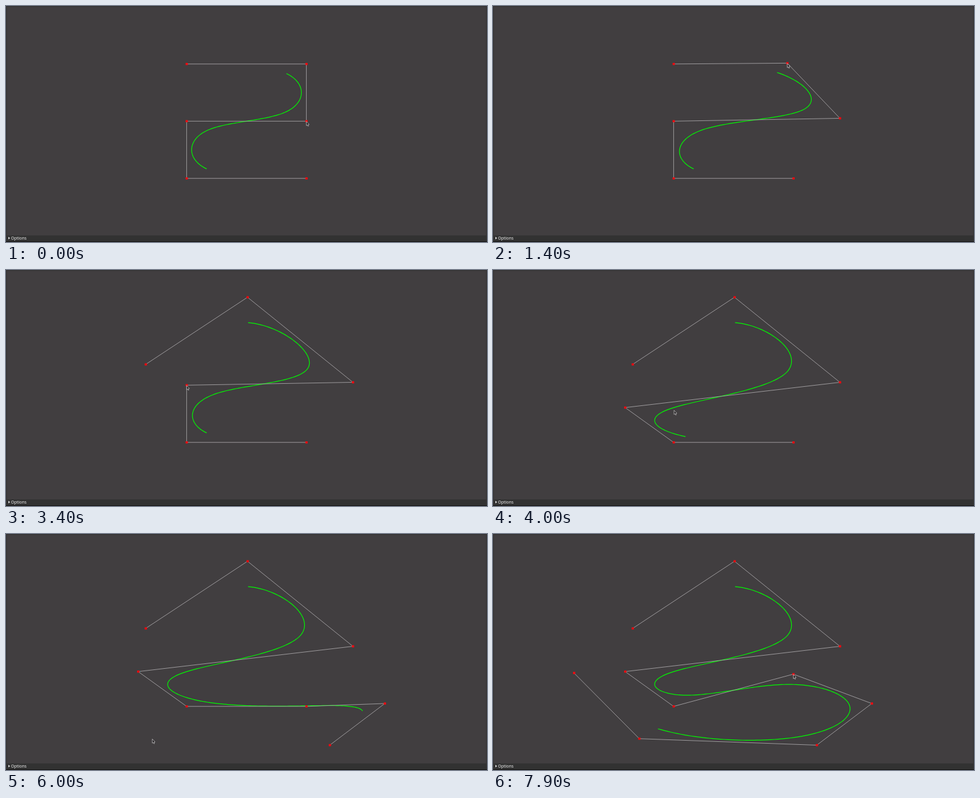
Recreate the animation shown at these times as an HTML page with a canvas. Size 800x394 px, loop 8000 ms.

```html
<!DOCTYPE html>
<html lang="en">
<head>
<meta charset="utf-8">
<title>B-spline editor</title>
<style>
  html, body { margin: 0; width: 100%; height: 100%; overflow: hidden; background: #413e40; }
  canvas { display: block; }
</style>
</head>
<body>
<canvas id="stage" width="800" height="394"></canvas>
<script>
const ctx = document.getElementById('stage').getContext('2d');
const STEP = 100, LOOP = 8000;

// Three rows, joined back and forth
const startPoints = Array.from({ length: 6 }, (_, i) => {
  const row = Math.floor(i / 2);
  const side = (i + row) % 2 ? 1 : -1;
  return [400 + side * 99.6, 192.3 + (row - 1) * 95.5];
});

// Each press moves an existing point or places a new one
const actions = [
  { point: 2, to: [577, 187.5], start: 1, end: 5 },
  { point: 1, to: [401.7, 45.5], start: 13, end: 18 },
  { point: 0, to: [232.3, 157.6], start: 23, end: 28 },
  { point: 3, to: [219.8, 229.7], start: 34, end: 37 },
  { point: 6, to: [630, 283], start: 46, end: 50 },
  { point: 7, to: [538.5, 352.5], start: 54, end: 54 },
  { point: 8, to: [243.3, 341.7], start: 61, end: 61 },
  { point: 9, to: [134.7, 232], start: 65, end: 66 },
  { point: 5, to: [499.5, 234], start: 72, end: 79 }
];

const strokes = [];
let place = startPoints[actions[0].point], released = -1;
for (const { point, to, start, end } of actions) {
  const grab = startPoints[point] || to;
  strokes.push({ from: place, to: grab, start: released + 1, end: start - 1 });
  strokes.push({ point, from: grab, to, start, end });
  place = to;
  released = end;
}

// Vertical motion trails the horizontal, so strokes arc slightly
function along({ from, to, start, end }, step) {
  const u = Math.min(1, (step - start) / Math.max(1, end - start));
  const k = u * u * (3 - 2 * u);
  return [
    from[0] + (to[0] - from[0]) * k,
    from[1] + (to[1] - from[1]) * k ** 1.6
  ];
}

function polyline(points, color, width) {
  ctx.beginPath();
  points.forEach(([x, y]) => ctx.lineTo(x, y));
  ctx.strokeStyle = color;
  ctx.lineWidth = width;
  ctx.stroke();
}

// Uniform cubic B-spline
function spline(points) {
  const curve = [], segments = 40;
  for (let i = 0; i + 3 < points.length; i++) {
    for (let j = 0; j <= segments; j++) {
      const u = j / segments, v = 1 - u;
      const weights = [
        v ** 3,
        3 * u ** 3 - 6 * u * u + 4,
        3 * v ** 3 - 6 * v * v + 4,
        u ** 3
      ];
      curve.push([0, 1].map(axis =>
        weights.reduce((sum, w, n) => sum + w * points[i + n][axis], 0) / 6));
    }
  }
  return curve;
}

function drawPanel() {
  ctx.fillStyle = '#343334';
  ctx.fillRect(0, 0, 800, 394);
  ctx.fillStyle = '#413e40';
  ctx.fillRect(1.5, 1.5, 797, 381.5);
  ctx.fillStyle = '#323232';
  ctx.fillRect(0, 383, 800, 10);
  ctx.fillStyle = '#111';
  ctx.fillRect(0, 393, 800, 1);
  ctx.fillStyle = '#eee';
  ctx.beginPath();
  ctx.moveTo(4, 385.2);
  ctx.lineTo(6.6, 387.5);
  ctx.lineTo(4, 389.8);
  ctx.fill();
  ctx.font = '7px "Noto Sans", sans-serif';
  ctx.fillText('Options', 8.2, 390);
}

function drawPointer([x, y]) {
  ctx.save();
  ctx.translate(x, y);
  ctx.beginPath();
  ctx.moveTo(0, 0.5);
  ctx.lineTo(0, 7.5);
  ctx.lineTo(1.6, 6.2);
  ctx.lineTo(2.7, 8.5);
  ctx.lineTo(3.7, 8);
  ctx.lineTo(2.7, 5.8);
  ctx.lineTo(4.7, 5.5);
  ctx.closePath();
  ctx.fillStyle = '#252325';
  ctx.fill();
  ctx.strokeStyle = '#d0ced0';
  ctx.lineWidth = 0.7;
  ctx.stroke();
  ctx.restore();
}

function draw(step) {
  const begun = strokes.filter(stroke => stroke.start <= step);
  const points = startPoints.slice();
  for (const stroke of begun) {
    if (stroke.point !== undefined) points[stroke.point] = along(stroke, step);
  }
  drawPanel();
  polyline(spline(points), '#00f800', 1.2);
  polyline(points, '#b4b2b4', 0.8);
  ctx.fillStyle = '#f40a10';
  for (const [x, y] of points) ctx.fillRect(x - 1.7, y - 1.8, 3.8, 3.6);
  drawPointer(along(begun[begun.length - 1], step));
}

function tick() {
  draw(Math.floor(performance.now() % LOOP / STEP));
  requestAnimationFrame(tick);
}
tick();
</script>
</body>
</html>
```
